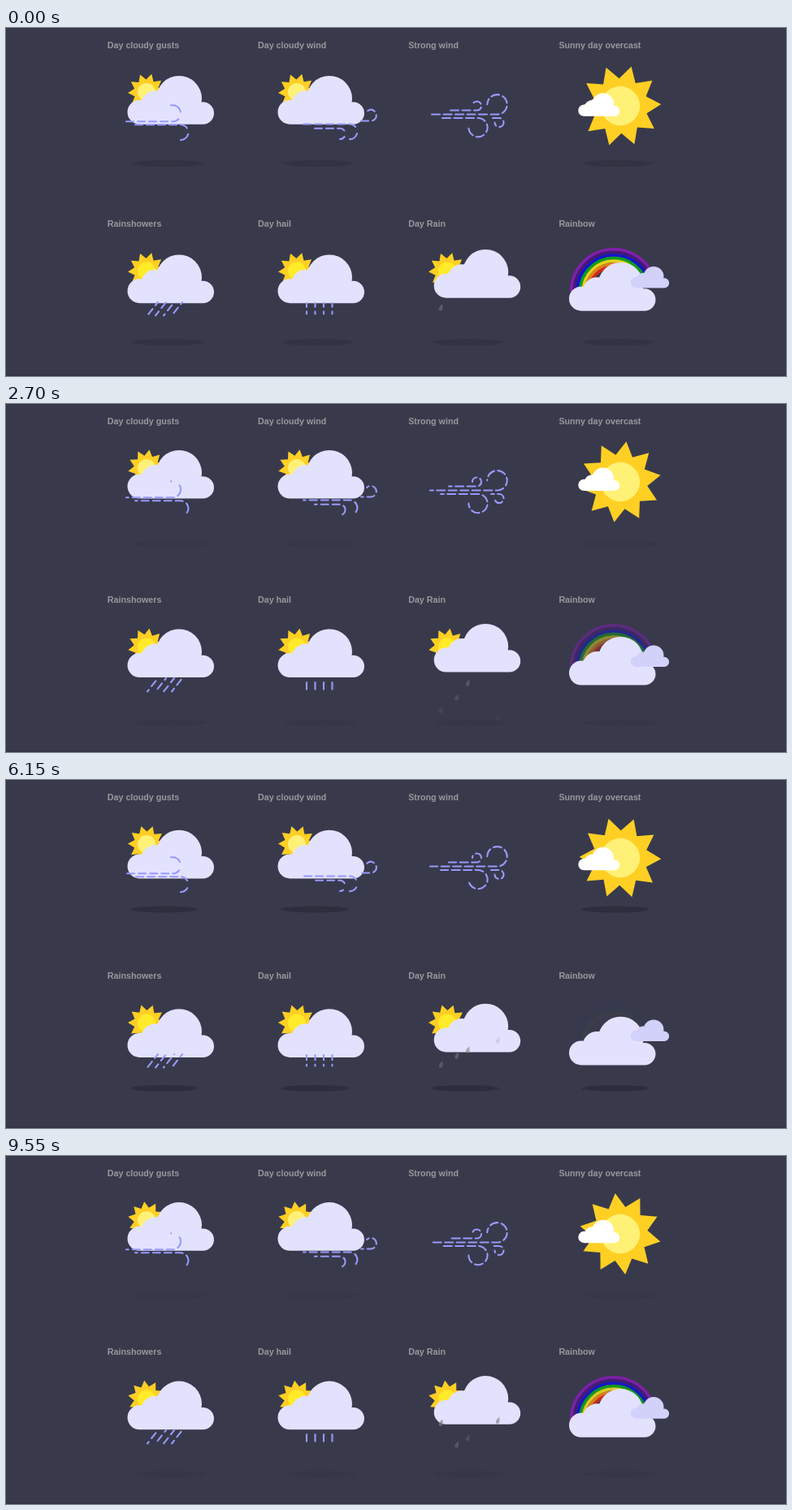
Animation, 960 px wide and 429 px high, one loop 9.6 s. Source, as an HTML page with a canvas:

```html
<!DOCTYPE html>
<html lang="en">
<head>
<meta charset="utf-8">
<title>Weather icons</title>
<style>
  html, body { margin: 0; height: 100%; overflow: hidden; background: #383a4c; }
  canvas { display: block; }
</style>
</head>
<body>
<canvas id="stage" width="960" height="429"></canvas>
<script>
const ctx = document.getElementById('stage').getContext('2d');
const LOOP = 9600, TAU = Math.PI * 2, ROW = 220.5, COL = 185;
const LILAC = '#e2e2ff', WIND = '#9999fa';
const titles = [
  ['Day cloudy gusts', 'Day cloudy wind', 'Strong wind', 'Sunny day overcast'],
  ['Rainshowers', 'Day hail', 'Day Rain', 'Rainbow']
];
const bands = ['#8a1cb8', '#45187c', '#1212d8', '#0aa81c', '#f6e21c', '#f58a14', '#e02a14'];

const paths = list => list.map(d => new Path2D(d));
const streams = paths([
  'M148 115.3H205a10 10 0 0 0 8.7-5', 'M159 119.3H215a9.4 9.4 0 0 1 8.1 4.7',
  'M366 118.5H423a9.3 9.3 0 0 1 8.1 4.7', 'M380 123.8H411a6.6 6.6 0 0 1 5.7 3.3',
  'M437 114.5H449a6.8 6.8 0 1 0-5-11.4'
]);
const curls = paths([
  'M213.7 110.3A10 10 0 0 0 205 95.3h-2', 'M223.1 124A9.4 9.4 0 0 1 215 138.1',
  'M431.1 123.2A9.3 9.3 0 0 1 423 137.1', 'M416.7 127.1A6.6 6.6 0 0 1 411 137'
]);
const gale = paths(['M545 101.5H579.5a5.5 5.5 0 1 0-5.5-5.5', 'M522 106.5H604.5a12.2 12.2 0 1 0-12.2-12.2',
  'M535 111H581a11.6 11.6 0 1 1-11.6 11.6', 'M597 111H607a5.5 5.5 0 1 1-5.5 5.5']);
const slants = paths([187, 197, 207, 217].map(x => `M${x} 338l-13 16.5`));
const hail = paths([370, 380.5, 391, 401.5].map(x => `M${x} 339V352.5`));
const dropShape = new Path2D('M2-4.5C3-1 3 3.5 0 3.8C-3.4 3.6-3-.5 2-4.5Z');

// Cloud with its bottom left corner at the origin, 106.5 wide
const cloudShape = new Path2D();
for (const [x, y, r] of [[15, -15, 15], [34.5, -23.5, 18], [63.5, -31.7, 28], [92.8, -13.7, 13.7]]) {
  cloudShape.moveTo(x + r, y);
  cloudShape.arc(x, y, r, 0, TAU);
}
cloudShape.rect(15, -22, 77.8, 22);

// Smooth swing from 0 at time low to 1 half a period later
const swing = (t, period, low) => (1 - Math.cos(TAU * (t - low) / period)) / 2;
const frac = x => x - Math.floor(x);

function disc(x, y, r, color) {
  ctx.fillStyle = color;
  ctx.beginPath();
  ctx.arc(x, y, r, 0, TAU);
  ctx.fill();
}

function sun(x, y, r, t, core) {
  const turn = (15.7 + 24 * t) * Math.PI / 180;
  ctx.fillStyle = '#ffcf24';
  ctx.beginPath();
  for (let i = 0; i < 20; i++) {
    const a = turn + i * TAU / 20, d = i % 2 ? r * 0.67 : r;
    ctx.lineTo(x + d * Math.sin(a), y - d * Math.cos(a));
  }
  ctx.fill();
  disc(x, y, r * 0.48, core);
}

function cloud(x, bottom, scale = 1, color = LILAC) {
  ctx.save();
  ctx.translate(x, bottom);
  ctx.scale(scale, scale);
  ctx.fillStyle = color;
  ctx.fill(cloudShape);
  ctx.restore();
}

function shadow(col, row, lift) {
  const s = 1 + 0.114 * lift;
  ctx.fillStyle = `rgba(0,0,0,${0.2 * (1 - lift)})`;
  ctx.beginPath();
  ctx.ellipse(109 + col * COL + 86 * s, row * ROW + 159.5 * s, 42 * s, 4.1 * s, 0, 0, TAU);
  ctx.fill();
}

// The front end of one dash lies at distance shift along the path
function dashes(list, dash, gap, shift, stagger = 0) {
  ctx.strokeStyle = WIND;
  ctx.lineWidth = 2.1;
  ctx.lineCap = 'round';
  ctx.setLineDash([dash, gap]);
  list.forEach((path, i) => {
    ctx.lineDashOffset = dash - shift - i * stagger;
    ctx.stroke(path);
  });
  ctx.setLineDash([]);
}

function drop(x, y, f) {
  ctx.save();
  ctx.globalAlpha = Math.min(1, f * 4) * (1 - f);
  ctx.translate(x, y);
  ctx.fillStyle = '#7c7c80';
  ctx.fill(dropShape);
  ctx.restore();
}

function rainbow(t) {
  ctx.save();
  ctx.globalAlpha = 1 - Math.pow(1 - frac((t - 1.1) / 5), 1.6);
  ctx.lineWidth = 3.7;
  ctx.lineCap = 'butt';
  bands.forEach((color, i) => {
    ctx.strokeStyle = color;
    ctx.beginPath();
    ctx.arc(748, 325, 52.2 - i * 3.6, Math.PI, TAU - 0.38);
    ctx.stroke();
  });
  ctx.restore();
}

function draw(t) {
  const lift = swing(t, 5, 1.1), rise = 6.7 * lift;
  const base = 121.4 - rise, flow = 9 + 18.4 * t;

  ctx.fillStyle = '#383a4c';
  ctx.fillRect(0, 0, 960, 429);
  ctx.fillStyle = '#323341';
  ctx.fillRect(0, 427, 960, 2);

  ctx.fillStyle = '#98989c';
  ctx.font = 'bold 10.7px "Liberation Sans", Arial, sans-serif';
  titles.forEach((row, j) => row.forEach((text, i) => ctx.fillText(text, 124.8 + i * 185.2, 24.5 + j * ROW)));

  for (const col of [0, 1, 3]) shadow(col, 0, lift);
  for (const col of [0, 1, 2, 3]) shadow(col, 1, lift);

  for (const x of [0, COL]) {
    sun(173 + x, 79, 23, t, '#fff176');
    cloud(149.5 + x, base);
    sun(173 + x, 79 + ROW, 23, t, '#ffeb28');
    cloud(149.5 + x, base + ROW);
  }
  dashes(streams, 9, 5, flow);
  dashes(curls, 16, 12, 2 * flow + 5);
  dashes(gale, 10, 4.5, flow + 3);
  dashes(slants, 8.5, 5.5, flow + 10, 4);
  dashes(hail, 8.5, 5.5, flow + 10);

  sun(756, 96, 50.3, t, '#fff176');
  cloud(704.3, 111.3 - rise * 0.9, 0.478, '#fff');

  sun(543, 79 + ROW, 23, t, '#ffeb28');
  cloud(526.7, base + 214);
  const slow = frac(t / 3), mid = frac((t + 0.93) / 2), quick = frac(t), short = frac((t - 0.02) / 0.75);
  drop(535, 320 + 78 * Math.pow(mid, 1.5), mid);
  drop(554.5, 334 + 40 * quick, quick);
  drop(568, 328 + 28 * short, short);
  drop(605, 320 + 78 * Math.pow(slow, 1.5), slow);

  rainbow(t);
  cloud(693, base + 230);
  cloud(768.8, 320.2 + 5.5 * swing(t, 7, 0.5), 0.445, '#d2d1fa');
}

function frame() {
  draw(performance.now() % LOOP / 1000);
  requestAnimationFrame(frame);
}
frame();
</script>
</body>
</html>
```
